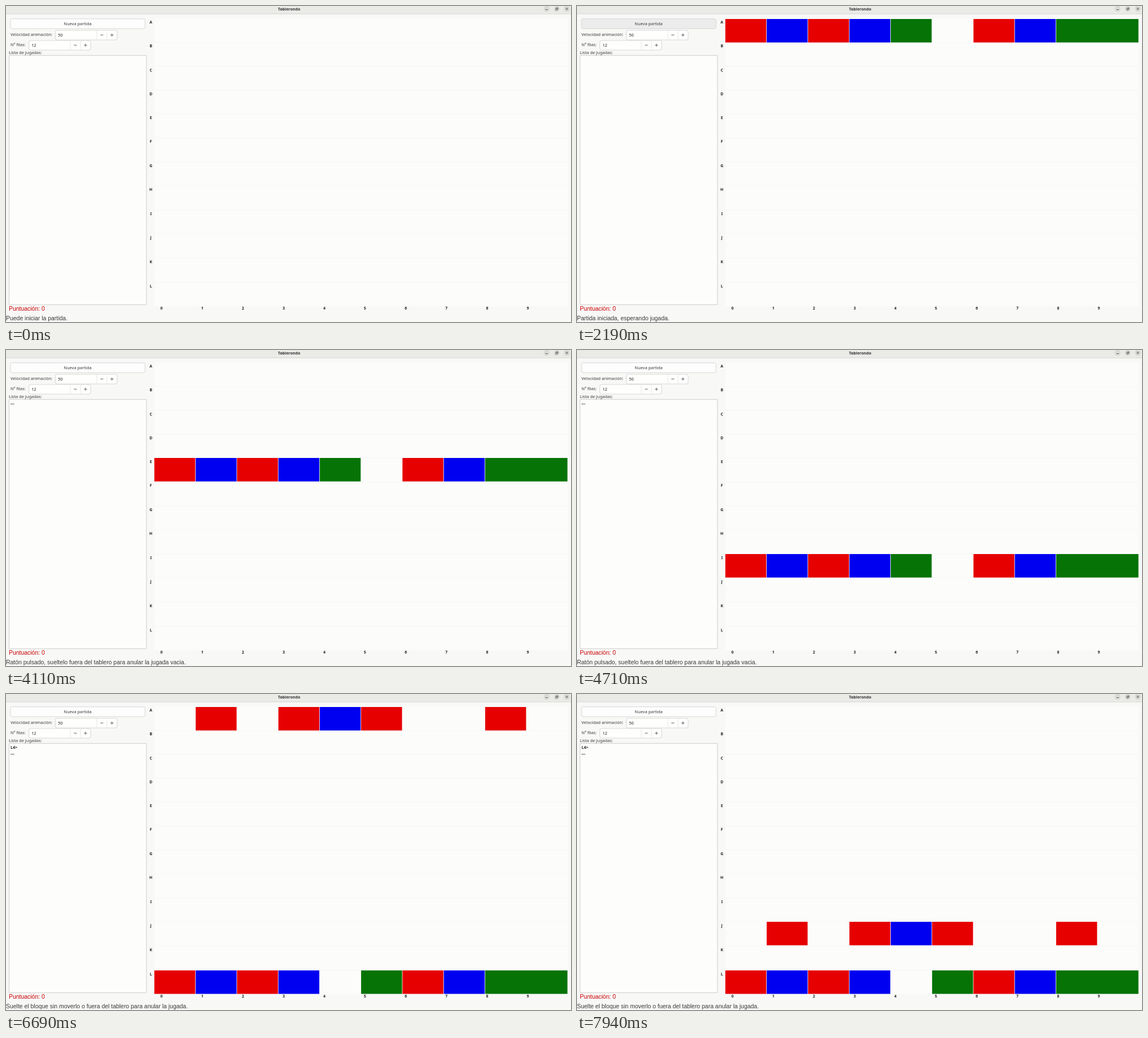
An HTML page with a canvas that plays this animation: 1001 by 559 pixels, repeating every 8000 ms.

```html
<!DOCTYPE html>
<html lang="es">
<head>
<meta charset="utf-8">
<style>
html, body { margin: 0; width: 100%; height: 100%; overflow: hidden; background: #f8f8f7; }
canvas { display: block; }
</style>
</head>
<body>
<canvas id="stage" width="1001" height="559"></canvas>
<script>
const ctx = document.getElementById('stage').getContext('2d');
const LOOP = 8000, ROWS = 12, LEFT = 262.8, CELL = 73.27;
const UI = '"Noto Sans", "Open Sans", sans-serif';
const SANS = '"Liberation Sans", Arial, sans-serif';
const COLORS = { r: '#e60000', b: '#0000f0', g: '#057305' };
const INK = '#3a3a3a';

// Timeline in ms
const HOVER = 1230, START = 1650, LEAVE = 2270;
const PRESS1 = 3360, DROP1 = 3490, FALL1 = 3655, ROW2 = 5210;
const PRESS2 = 6310, DROP2 = 6430, SLIDE = 6600, FALL2 = 6748;

const STATUS = [
  [0, 'Puede iniciar la partida.'],
  [START, 'Partida iniciada, esperando jugada.'],
  [PRESS1, 'Ratón pulsado, sueltelo fuera del tablero para anular la jugada vacia.'],
  [PRESS2, 'Suelte el bloque sin moverlo o fuera del tablero para anular la jugada.']
];

const clamp = (v, a, b) => Math.max(a, Math.min(b, v));
const rowTop = r => 22.5 + 42.05 * r + 0.03 * r * r;
const fallRow = (t, start, step) => clamp(Math.floor((t - start) / step) + 1, 0, ROWS - 1);

function text(s, x, y, size = 7.45, color = INK, weight = 400, align = 'left', family = UI) {
  ctx.font = `${weight} ${size}px ${family}`;
  ctx.fillStyle = color;
  ctx.textAlign = align;
  ctx.fillText(s, x, y);
}

function rect(x, y, w, h, fill) {
  ctx.fillStyle = fill;
  ctx.fillRect(x, y, w, h);
}

function line(color, width, ...points) {
  ctx.strokeStyle = color;
  ctx.lineWidth = width;
  ctx.beginPath();
  for (let i = 0; i < points.length; i += 4) {
    ctx.moveTo(points[i], points[i + 1]);
    ctx.lineTo(points[i + 2], points[i + 3]);
  }
  ctx.stroke();
}

function box(x, y, w, h, radius, fill, border = '#cdcdcd') {
  ctx.beginPath();
  ctx.roundRect(x, y, w, h, radius);
  ctx.fillStyle = fill;
  ctx.fill();
  ctx.strokeStyle = border;
  ctx.lineWidth = 0.8;
  ctx.stroke();
}

function spin(x, y, value) {
  box(x, y, 109.5, 17, 3, '#fefefd');
  line('#dededd', 0.7, x + 73.5, y + 1, x + 73.5, y + 16, x + 91.5, y + 1, x + 91.5, y + 16);
  text(value, x + 4.5, y + 11.2, 7.45, '#202020', 500);
  const cy = y + 8.3;
  line('#555', 0.9, x + 79.7, cy, x + 85, cy, x + 97.6, cy, x + 103, cy,
    x + 100.3, cy - 2.7, x + 100.3, cy + 2.7);
}

function titleBar() {
  rect(0, 0, 1001, 14, '#eaeae7');
  rect(0, 13.5, 1001, 1, '#d8d9d3');
  text('Tablerondo', 501.5, 7.6, 7.1, '#333', 700, 'center');
  for (const x of [957.8, 975.7, 993.6]) {
    ctx.beginPath();
    ctx.arc(x, 5, 5.2, 0, 7);
    ctx.fillStyle = '#d9dad7';
    ctx.fill();
  }
  line('#444', 0.9, 955.8, 6.5, 959.8, 6.5, 991.6, 3, 995.6, 7, 995.6, 3, 991.6, 7);
  ctx.lineWidth = 0.8;
  ctx.strokeRect(974, 4.2, 2.8, 2.8);
  line('#444', 0.7, 975, 3, 978, 3, 978, 3, 978, 6);
}

function panel(t) {
  const hover = clamp((t - HOVER) / 200, 0, 1) - clamp((t - LEAVE) / 200, 0, 1);
  const shade = Math.round(253 - 17 * hover);
  box(8, 22.7, 238.3, 17.4, 3, `rgb(${shade},${shade},${shade})`);
  text('Nueva partida', 127, 34, 7.45, INK, 400, 'center');
  text('Velocidad animación:', 8, 52.7);
  spin(87.4, 43, '50');
  text('Nº filas:', 8, 70.6);
  spin(40.5, 61, '12');
  text('Lista de jugadas:', 5, 85.4);
  box(5.4, 87.4, 243.4, 441, 0, '#fdfdfb', '#c4c5c2');

  const plays = t < DROP1 ? [] : t < DROP2 ? ['---'] : ['L4>', '---'];
  plays.forEach((p, i) => text(p, 8, 96.6 + 11 * i, 7.1, '#222', 700));

  text('Puntuación: 0', 5, 538.6, 10.45, '#c80000', 400, 'left', SANS);
  const status = STATUS.filter(s => t >= s[0]).pop()[1];
  text(status, 0, 556.3, 10.45, INK, 400, 'left', SANS);
}

// A piece is [column, colour, length]
function pieces(row, list) {
  const top = Math.round(rowTop(row)), bottom = Math.round(rowTop(row) + 42);
  for (const [col, color, len = 1] of list)
    rect(LEFT + col * CELL, top, len * CELL - 0.8, bottom - top - 0.5, COLORS[color]);
}

function board(t) {
  rect(263, 22, 732.5, 509, '#fcfcfb');
  for (let r = 0; r < ROWS; r++) {
    if (r) rect(263, Math.round(rowTop(r)) - 1, 732.5, 1, '#f6f6f5');
    text(String.fromCharCode(65 + r), 256.7, rowTop(r) + 8.9, 6.8, '#222', 700, 'center');
  }
  for (let c = 0; c < 10; c++)
    text(c, 275.6 + 72.1 * c, 537.2, 7, '#222', 700, 'center');

  if (t >= START) {
    const green = t < SLIDE ? 4 : 5;
    pieces(fallRow(t, FALL1, 150), [[0, 'r'], [1, 'b'], [2, 'r'], [3, 'b'],
      [green, 'g'], [6, 'r'], [7, 'b'], [8, 'g', 2]]);
  }
  if (t >= ROW2)
    pieces(fallRow(t, FALL2, 148), [[1, 'r'], [3, 'r'], [4, 'b'], [5, 'r'], [8, 'r']]);
}

function draw(t) {
  rect(0, 0, 1001, 559, '#f8f8f7');
  titleBar();
  panel(t);
  board(t);
}

const begin = performance.now();
function tick() {
  draw((performance.now() - begin) % LOOP);
  requestAnimationFrame(tick);
}
tick();
</script>
</body>
</html>
```
